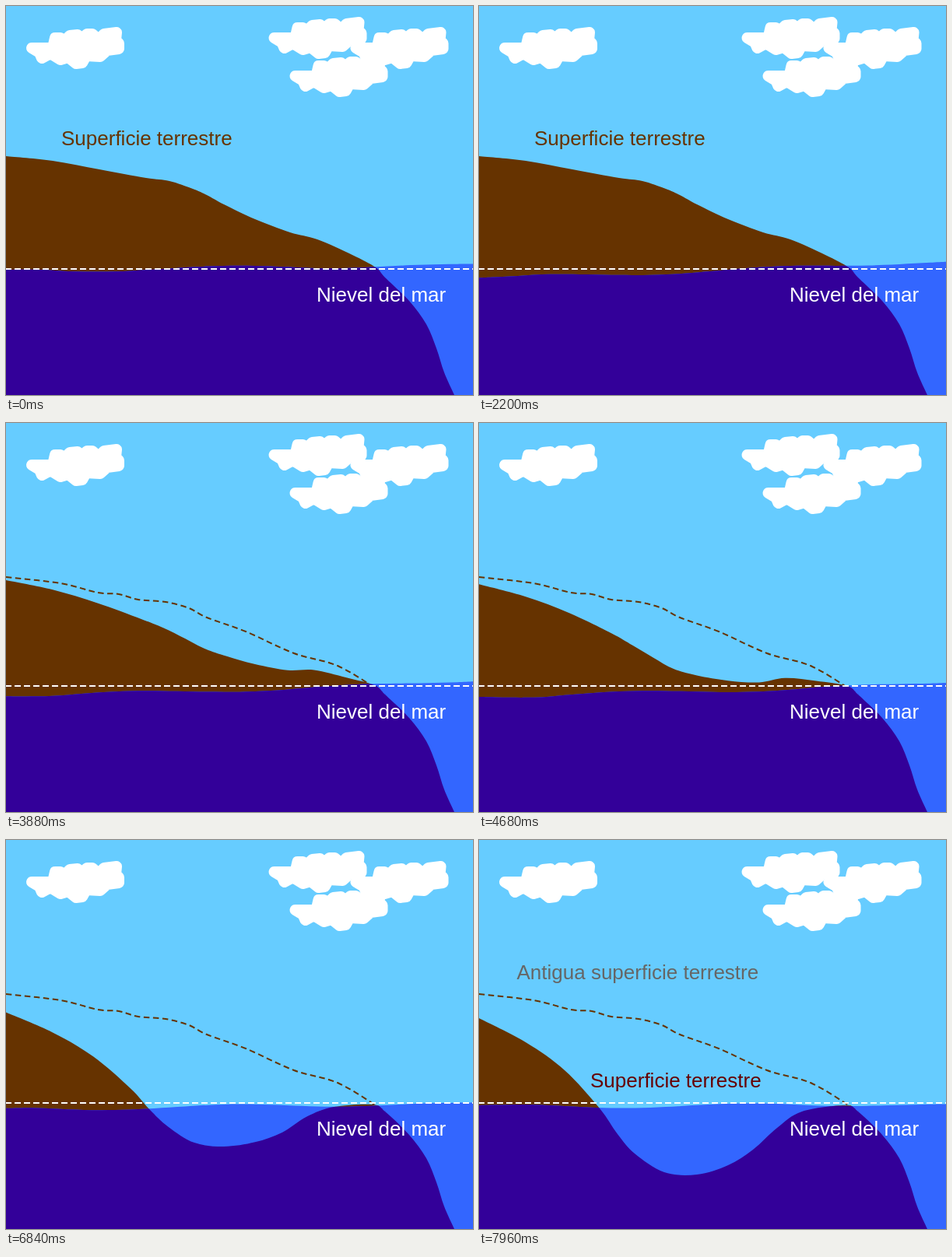
Animation, 600 px wide and 500 px high, one loop 8000 ms. Source, as an HTML page:

```html
<!DOCTYPE html>
<html lang="es">
<head>
<meta charset="utf-8">
<title>Superficie terrestre</title>
<style>
  html, body { margin: 0; width: 100%; height: 100%; overflow: hidden; background: #6cf; }
  svg { display: block; width: 100vw; height: 100vh; }
  text { font: 26px "Liberation Sans", Arial, sans-serif; }
</style>
</head>
<body>
<svg viewBox="0 0 600 500">
  <defs>
    <path id="cloud" fill="#fff" stroke="#fff" stroke-width="14" stroke-linejoin="round"
      d="M33 54H60L63 41H70L75 45 82 38 92 37 97 42 104 36H111L119 43 126 36 142 34 141 44
         145 48V55L130 57 121 65 103 64 98 73 90 74 80 66 70 69 57 61 46 67 43 60Z"/>
    <clipPath id="sea"><path id="water"/></clipPath>
    <g id="ground">
      <path id="old" fill="none" stroke="currentColor" stroke-width="2" stroke-dasharray="7.5 4.5"/>
      <path id="land" fill="currentColor"/>
    </g>
  </defs>
  <rect width="600" height="500" fill="#6cf"/>
  <use href="#cloud"/>
  <use href="#cloud" x="311.5" y="-13"/>
  <use href="#cloud" x="416.5"/>
  <use href="#cloud" x="338.5" y="36"/>
  <use href="#ground" color="#630"/>
  <g clip-path="url(#sea)">
    <rect width="600" height="500" fill="#36f"/>
    <use href="#ground" color="#309"/>
  </g>
  <path d="M0 338H600" stroke="#fff" stroke-width="2" stroke-dasharray="8 4" stroke-dashoffset="1"/>
  <text id="before" x="71" y="179" fill="#630">Superficie terrestre</text>
  <g id="after">
    <text x="48.5" y="179" fill="#666">Antigua superficie terrestre</text>
    <text x="143" y="318" fill="#600">Superficie terrestre</text>
  </g>
  <text x="399" y="380" fill="#fff">Nievel del mar</text>
</svg>
<script>
const LOOP = 8000, STEP = 40, ERODE = 2520, LABELS = 7220, END = 7960;
const $ = id => document.getElementById(id);
const mix = (a, b, k) => a + (b - a) * k;

// Hill points: x, y before erosion, then x, y after it
const hill = [
  [0, 193, 0, 229], [60, 199, 60, 260], [120, 210, 110, 296], [180, 221, 155, 345],
  [210, 225, 178, 378], [240, 235, 200, 403], [258, 243, 238, 427], [280, 255, 280, 430],
  [320, 274, 320, 418], [365, 291, 352, 398], [400, 300, 383, 370], [445, 320, 415, 349],
  [475, 336, 470, 341]
];
const coast = [[487, 349], [518, 379], [540, 409], [553, 440], [563, 471], [576, 500]];
const oldLine = [[0, 198], [70, 206], [118, 218], [145, 220], [170, 227], [205, 230],
  [235, 238], [258, 250], [308, 268], [370, 296], [428, 313], [487, 349]];

// Water level at both edges: time, left, right
const tide = [[0, 339, 331.5], [480, 347.5, 325], [4680, 352, 334], [END, 341, 339.5]];

// Smooth curve through all points
function curve(pts) {
  let d = `M${pts[0]}`;
  for (let i = 0; i < pts.length - 1; i++) {
    const a = pts[i], b = pts[i + 1], p = pts[i - 1] || a, n = pts[i + 2] || b;
    const c1 = a.map((v, k) => v + (b[k] - p[k]) / 6);
    const c2 = b.map((v, k) => v - (n[k] - a[k]) / 6);
    d += `C${c1} ${c2} ${b}`;
  }
  return d;
}

function landPath(t) {
  const k = Math.min(1, Math.max(0, (t - ERODE) / (END - ERODE)));
  const pts = hill.map(([x0, y0, x1, y1]) => [mix(x0, x1, k), mix(y0, y1, k)]);
  return curve(pts.concat(coast)) + "H0Z";
}

// Tilting surface with a swell that travels to the right
function waterPath(t) {
  const i = Math.max(1, tide.findIndex(s => s[0] >= t));
  const [t0, l0, r0] = tide[i - 1], [t1, l1, r1] = tide[i];
  const k = (t - t0) / (t1 - t0);
  const left = mix(l0, l1, k), right = mix(r0, r1, k), crest = 126 + 0.048 * t;
  const pts = [];
  for (let x = 0; x <= 600; x += 20) {
    const fade = Math.min(1, x / 80, (600 - x) / 200);
    const swell = 1.2 + 2.8 * Math.cos((x - crest) / 320 * 2 * Math.PI);
    pts.push([x, mix(left, right, x / 600) + swell * fade]);
  }
  return curve(pts) + "V500H0Z";
}

function show(id, on) {
  $(id).style.display = on ? "" : "none";
}

function draw(t) {
  $("land").setAttribute("d", landPath(t));
  $("water").setAttribute("d", waterPath(t));
  show("old", t > ERODE);
  show("before", t <= ERODE);
  show("after", t >= LABELS);
}

$("old").setAttribute("d", curve(oldLine));

const start = performance.now();
function tick() {
  const t = (performance.now() - start) % LOOP;
  draw(Math.floor(t / STEP) * STEP);
  requestAnimationFrame(tick);
}
tick();
</script>
</body>
</html>
```
